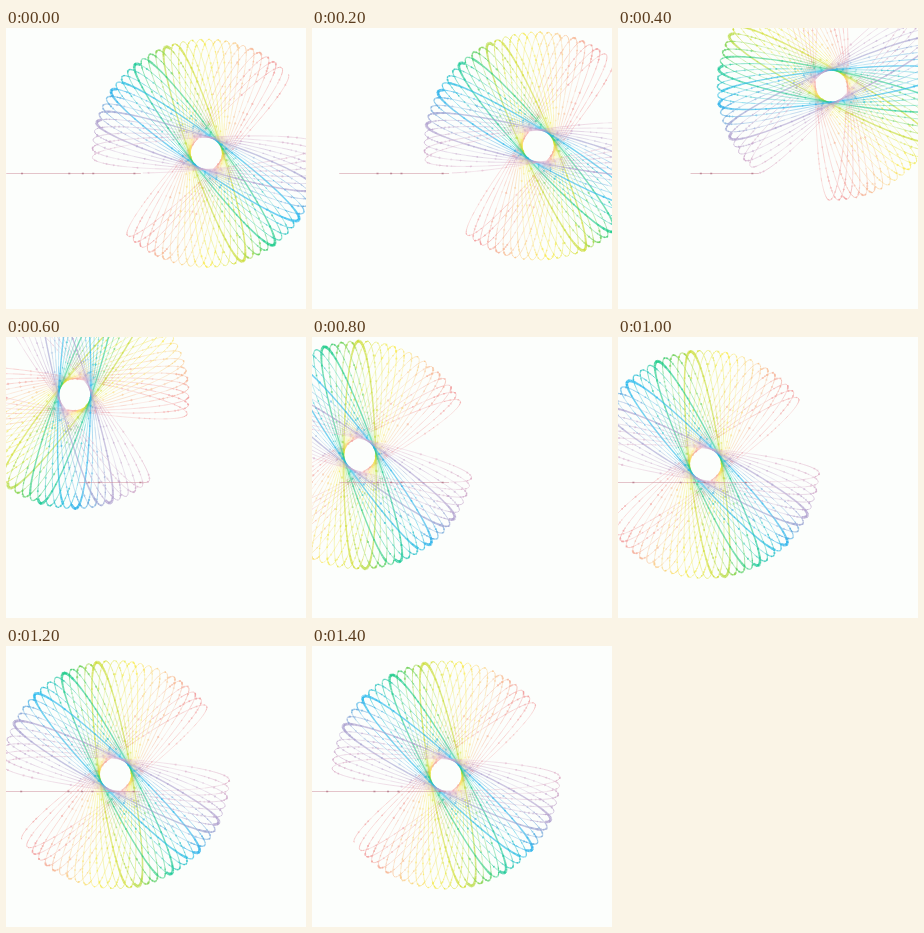
An HTML page with a canvas that plays this animation: 300 px wide and 281 px high, repeating every 1.6 s.

```html
<!DOCTYPE html>
<html lang="en">
<head>
<meta charset="utf-8">
<title>Rolling rosette</title>
<style>
html, body { margin: 0; width: 100%; height: 100%; overflow: hidden; background: #fcfefc; }
canvas { display: block; width: 300px; height: 281px; }
</style>
</head>
<body>
<canvas id="stage" width="300" height="281"></canvas>
<script>
const ctx = document.getElementById('stage').getContext('2d');
const TAU = Math.PI * 2, RAD = Math.PI / 180;
const A = 114, B = 16;              // half axes of each loop
const TURNS = 31, SPREAD = 4.45;    // loops, degrees between them
const FIRST = 64.7;                 // angle of the first loop
const BAND = 4 * SPREAD;            // degrees between colours
const PEN_Y = 145, STEP = 200, DT = 0.06;

// how far the pen has travelled round the current loop at each step
const phases = [0.63, 0.95, 1.45, 1.69, 2.19, 2.71, 2.92, Math.PI];

// one colour per band, from the newest loops to the oldest
const colours = [
  [238, 180, 194], [214, 172, 202], [170, 158, 206], [30, 182, 238], [30, 204, 140],
  [202, 220, 52], [250, 236, 84], [250, 200, 146], [242, 160, 160]
];

function colourAt(angle) {
  const pos = Math.max(0, Math.min(colours.length - 1.001, angle / BAND + 5));
  const i = Math.floor(pos), k = pos - i;
  return colours[i].map((v, n) => Math.round(v + (colours[i + 1][n] - v) * k)).join(',');
}

function noise(n) {
  const v = Math.sin(n * 12.9898) * 43758.5453;
  return v - Math.floor(v);
}

function penAngle(t) {
  return FIRST - SPREAD * t / TAU;
}

function point(t) {
  const a = penAngle(t) * RAD, c = Math.cos(a), s = Math.sin(a);
  const x = A * Math.cos(t), y = B * Math.sin(t);
  return [x * c - y * s, x * s + y * c];
}

function strand(t, seed) {
  const angle = penAngle(t), loop = Math.round(angle / SPREAD);
  const bold = loop % 4 === 0 && loop <= 0 && loop >= -12;
  const vivid = angle < 4 && angle > -56;
  const tip = Math.cos(t) ** 10;
  const alpha = bold ? 0.62 + 0.2 * tip : (0.45 + 0.2 * tip) * (0.6 + 0.8 * noise(seed));
  const [x, y] = point(t), [x2, y2] = point(t + DT);

  ctx.strokeStyle = ctx.fillStyle = `rgba(${colourAt(angle)},${alpha})`;
  ctx.lineWidth = bold ? 1.4 + 1.5 * tip : 0.7 + (vivid ? 0.6 : 0.15) * tip;
  ctx.beginPath();
  ctx.moveTo(x, y);
  ctx.lineTo(x2, y2);
  ctx.stroke();
  if (noise(seed + 0.5) > 0.72) {
    const r = 0.6 + 0.4 * noise(seed + 7);
    ctx.fillRect(x - r, y - r, 2 * r, 2 * r);
  }
}

function line(from, to) {
  ctx.fillStyle = 'rgba(205,140,154,0.5)';
  ctx.fillRect(from, PEN_Y, to - from, 1);
  ctx.fillStyle = 'rgba(165,95,115,0.6)';
  for (let i = 1; i <= 5; i++) {
    const x = to - 130 * noise(i);
    if (x > from) ctx.fillRect(x, PEN_Y - 0.3, 2, 1.6);
  }
}

// the rosette turns so that the pen always heads left along the line
function draw(phase) {
  const end = (TURNS + 0.75) * TAU + phase;
  const lift = Math.sin(phase) ** 4;
  const penX = 134 + 7 * lift;
  const heading = Math.atan2(B * Math.sin(phase), A * Math.cos(phase));
  const [x, y] = point(end);

  ctx.fillStyle = '#fcfefc';
  ctx.fillRect(0, 0, 300, 281);
  ctx.save();
  ctx.translate(penX, PEN_Y);
  ctx.rotate(Math.PI - heading - penAngle(end) * RAD);
  ctx.translate(-x, -y);
  const count = Math.floor(end / DT);
  for (let i = 0; i < count; i++) strand(i * DT, i);
  ctx.restore();
  line(Math.max(0, 85 * lift - 10), penX);
}

let shown = -1;
const start = performance.now();
function tick(now) {
  const n = Math.floor(Math.max(0, now - start) / STEP) % phases.length;
  if (n !== shown) draw(phases[shown = n]);
  requestAnimationFrame(tick);
}
tick(start);
</script>
</body>
</html>
```
